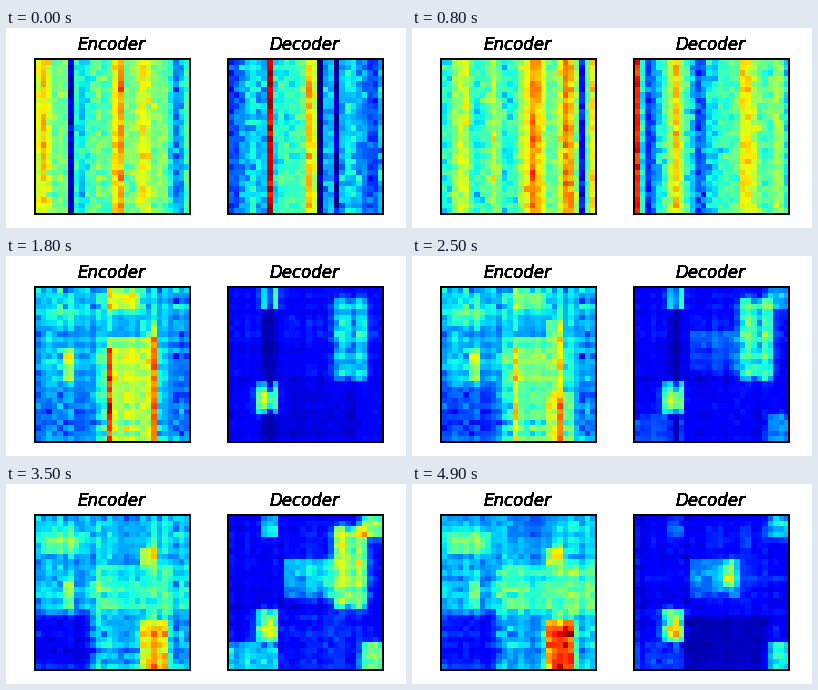
A matplotlib script for the animation above (6.5 s loop, 400 by 200 pixels).

```python
import numpy as np
import matplotlib.pyplot as plt
from matplotlib.animation import FuncAnimation

WIDTH, HEIGHT, DPI = 400, 200, 100
N = 28
STEP_MS, LOOP_MS = 100, 6500
LAST_STEP = 49
SECOND_STRIPES, MAPS_START = 8, 18
MAP_TIMES = (MAPS_START, 35, LAST_STEP)
CELLS = np.arange(N)


def stripes(seed, level, *humps):
    """Vertical bands: humps of (centre, width, height) on a level, with grain."""
    rng = np.random.default_rng(seed)
    profile = level + rng.normal(0, 0.03, N)
    for centre, width, height in humps:
        profile += height * np.exp(-((CELLS - centre) / width) ** 2 / 2)
    return profile + rng.normal(0, 0.04, (N, N))


def window(start, stop, softness=0.3):
    """Soft-edged band of cells from start up to stop."""
    middle = CELLS + 0.5
    rise = 1 / (1 + np.exp((start - middle) / softness))
    fall = 1 / (1 + np.exp((middle - stop) / softness))
    return rise * fall


def weave(rng):
    """Crossing row and column bands, with a low-rank plaid and fine grain."""
    plaid = rng.normal(0, 1, (N, 3)) @ rng.normal(0, 1, (3, N))
    return (rng.normal(0, 0.13, N) + rng.normal(0, 0.1, (N, 1))
            + 0.07 * plaid + rng.normal(0, 0.04, (N, N)))


class AttentionMap:
    """Stripes that dissolve into patches whose strengths change over time."""

    def __init__(self, seed, base, first, second, patches):
        rng = np.random.default_rng(seed)
        self.base, self.first, self.second = base, first, second
        self.weaves = weave(rng), weave(rng)
        self.patches = [(np.outer(window(*rows), window(*cols)), strengths)
                        for cols, rows, strengths in patches]

    def patchwork(self, step):
        grid = np.full((N, N), self.base)
        for shape, strengths in self.patches:
            grid += shape * np.interp(step, MAP_TIMES, strengths)
        grid = np.clip(grid, 0.05, 1)
        angle = np.pi / 2 * (step - MAPS_START) / (LAST_STEP - MAPS_START)
        texture = np.cos(angle) * self.weaves[0] + np.sin(angle) * self.weaves[1]
        return grid * (1 + texture * (1 - 0.6 * grid))

    def at(self, step):
        if step <= SECOND_STRIPES:
            return mix(self.first, self.second, step / SECOND_STRIPES)
        if step < MAPS_START:
            t = (step - SECOND_STRIPES) / (MAPS_START - SECOND_STRIPES)
            return mix(self.second, self.patchwork(MAPS_START), t)
        return self.patchwork(step)


def mix(a, b, t):
    return (1 - t) * a + t * b


# Patches: column span, row span, strength at each of MAP_TIMES.
encoder = AttentionMap(
    3, 0.29,
    stripes(1, 0.46, (1, 1.3, 0.2), (6, 0.4, -0.36), (8, 0.9, -0.12),
            (14.6, 0.6, 0.34), (19, 1.2, 0.2), (25.5, 0.7, -0.18)),
    stripes(2, 0.39, (3, 0.9, 0.27), (9, 0.7, 0.2), (16.3, 1.6, 0.38),
            (22.4, 1.2, 0.38), (25, 0.4, -0.3), (27, 0.4, 0.32)),
    [((13, 22), (9, 28), (0.28, 0.03, 0.02)),
     ((13, 14), (11, 28), (0.35, 0, 0)),
     ((21, 22), (7, 28), (0.28, 0, 0)),
     ((13, 19), (0, 4), (0.32, 0, -0.05)),
     ((19, 24), (19, 28), (0, 0.38, 0.55)),
     ((19, 22), (6, 9), (0.08, 0.34, 0.34)),
     ((1, 9), (3, 7), (0.05, 0.13, 0.17)),
     ((5, 7), (11, 17), (0.25, 0.17, 0.16)),
     ((0, 10), (18, 28), (-0.05, -0.18, -0.15)),
     ((10, 28), (9, 18), (0, 0.08, 0.13))])

decoder = AttentionMap(
    7, 0.12,
    stripes(5, 0.33, (0, 1.5, -0.12), (7, 0.3, 0.62), (11.5, 1.4, 0.12),
            (14.5, 0.6, 0.47), (16, 0.4, -0.35), (19, 0.3, -0.27),
            (25, 1, -0.15)),
    stripes(6, 0.37, (0, 0.3, 0.48), (2.5, 1.3, -0.12), (7, 1, 0.28),
            (11.3, 0.9, -0.15), (20, 1.3, 0.32), (25, 1, 0.22)),
    [((6, 9), (0, 4), (0.4, 0.25, 0.1)),
     ((5, 9), (17, 23), (0.35, 0.35, 0.36)),
     ((6, 8), (19, 22), (0.35, 0.25, 0.28)),
     ((7, 8), (0, 28), (-0.4, 0, 0)),
     ((19, 25), (2, 17), (0.2, 0.39, 0.02)),
     ((10, 19), (8, 15), (0, 0.2, 0.15)),
     ((16, 18), (8, 13), (0, 0, 0.27)),
     ((24, 28), (0, 4), (0, 0.42, 0.27)),
     ((24, 28), (23, 28), (0, 0.4, 0.28)),
     ((0, 9), (23, 28), (0, 0.24, 0.06)),
     ((9, 24), (18, 28), (-0.03, 0.03, -0.07))])


def add_panel(title, left, top=31, size=155):
    ax = fig.add_axes([left / WIDTH, 1 - (top + size) / HEIGHT,
                       size / WIDTH, size / HEIGHT])
    ax.set(xticks=[], yticks=[])
    for spine in ax.spines.values():
        spine.set_linewidth(1.44)
    # Overprinting gives the title its heavy edges.
    for _ in range(10):
        fig.text((left + size / 2 - 1) / WIDTH, 1 - (top - 9) / HEIGHT, title,
                 ha="center", va="baseline", size=12, style="italic",
                 family="DejaVu Sans")
    return ax.imshow(np.zeros((N, N)), cmap="jet", vmin=0, vmax=1,
                     interpolation="nearest", aspect="auto")


fig = plt.figure(figsize=(WIDTH / DPI, HEIGHT / DPI), dpi=DPI,
                 facecolor="white")
panels = [(add_panel("Encoder", 29), encoder),
          (add_panel("Decoder", 222), decoder)]


def update(frame):
    step = min(frame, LAST_STEP)
    for image, attention in panels:
        image.set_data(attention.at(step))
    return [image for image, _ in panels]


animation = FuncAnimation(fig, update, frames=LOOP_MS // STEP_MS,
                          interval=STEP_MS, repeat=True, repeat_delay=0)
plt.show()
```
